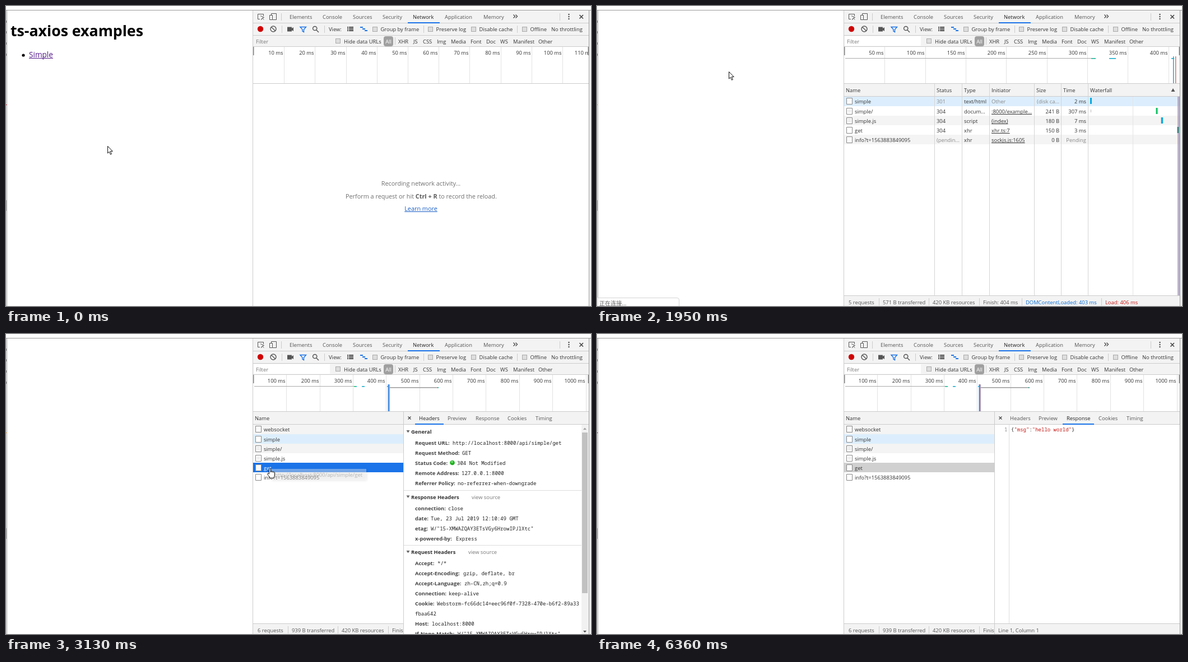
An HTML page with a canvas that plays this animation: 1044x536 px, repeating every 6.46 s.

```html
<!DOCTYPE html>
<html lang="zh-CN">
<head>
<meta charset="utf-8">
<title>Network panel demo</title>
<style>
  html, body { margin: 0; width: 100%; height: 100%; overflow: hidden; background: #fff; }
  canvas { display: block; }
</style>
</head>
<body>
<canvas id="stage" width="1044" height="536"></canvas>
<script>
const ctx = document.getElementById('stage').getContext('2d');
const LOOP = 6460;
const SANS = '"Open Sans", "Noto Sans CJK SC", sans-serif';
const MONO = '"Noto Sans Mono", monospace';
const UI = 9.4;
const INK = '#333', MUTED = '#888', BAR = '#f3f3f3', LINE = '#ccc', BLUE = '#1a73e8';
const SKY = '#03a9e4', GREEN = '#10c060';

// ---- helpers ----
function box(x, y, w, h, color) {
  ctx.fillStyle = color;
  ctx.fillRect(x, y, w, h);
}
const vline = (x, y, h, color = LINE) => box(x, y, 1, h, color);
const hline = (x, y, w, color = LINE) => box(x, y, w, 1, color);

function text(str, x, y, { color = INK, size = UI, bold = false, family = SANS, align = 'left', underline = false } = {}) {
  ctx.font = `${bold ? 'bold ' : ''}${size}px ${family}`;
  ctx.textAlign = align;
  ctx.fillStyle = color;
  ctx.fillText(str, x, y);
  const width = ctx.measureText(str).width;
  if (underline) hline(align === 'center' ? x - width / 2 : x, Math.round(y + 1), width, color);
  return width;
}
const mono = (str, x, y, color = '#222') => text(str, x, y, { family: MONO, size: 9, color });

function path(d, { x = 0, y = 0, fill, stroke, width = 1 }) {
  const shape = new Path2D(d);
  ctx.save();
  ctx.translate(x, y);
  if (fill) { ctx.fillStyle = fill; ctx.fill(shape); }
  if (stroke) { ctx.strokeStyle = stroke; ctx.lineWidth = width; ctx.stroke(shape); }
  ctx.restore();
}

function disc(x, y, r, color) {
  ctx.fillStyle = color;
  ctx.beginPath();
  ctx.arc(x, y, r, 0, 7);
  ctx.fill();
}

function clipped(x, y, w, h, draw) {
  ctx.save();
  ctx.beginPath();
  ctx.rect(x, y, w, h);
  ctx.clip();
  draw();
  ctx.restore();
}

function faded(alpha, draw) {
  ctx.save();
  ctx.globalAlpha = alpha;
  draw();
  ctx.restore();
}

function checkbox(x, y) {
  box(x, y, 9, 9, '#aaa');
  box(x + 1, y + 1, 7, 7, '#dedede');
}

// Last keyframe whose time has been reached.
const at = (keys, t) => keys.filter(k => k[0] <= t).pop();

// ---- timing ----
const cursorKeys = [
  [0, 181, 250], [260, 172, 238], [380, 145, 200], [500, 112, 155], [620, 86, 120], [740, 74, 104],
  [890, 64, 88, 'hand'],
  [1830, 140, 98], [1950, 235, 117], [2070, 305, 138], [2220, 372, 160], [2340, 421, 178],
  [2460, 443, 203], [2580, 454, 220], [2730, 466, 240, 'hand'],
  [3540, 540, 224], [3660, 655, 198], [3790, 775, 176], [3910, 832, 166],
  [4060, 868, 147], [4180, 854, 150],
  [5260, 885, 205], [5380, 940, 335], [5500, 971, 429], [5650, 1004, 494], [5800, 1010, 521],
  [5930, 1010, 560]
];
// time, pixels per tick, ms per tick
const scaleKeys = [[0, 55.2, 10], [1830, 72.35, 50], [2220, 92.6, 100], [2460, 74, 100], [2580, 59.35, 100]];
const bubbleKeys = [[0, 0], [890, .4], [1010, .8], [1140, 1], [2220, .5], [2340, .15], [2460, 0]];
const tooltipKeys = [[0, 0], [2860, 1], [3130, .38], [3260, 0]];

// ---- table data: name, status, type, initiator, size, time ----
const simple = ['simple', '301', 'text/html', 'Other', '(disk ca...', '2 ms'];
const page = ['simple/', '304', 'docum...', ':8000/example...', '241 B', '307 ms'];
const pagePending = ['simple/', '(pendin...', 'docum...', ':8000/example...', '0 B', 'Pending'];
const script = ['simple.js', '304', 'script', '(index)', '180 B', '7 ms'];
const get = ['get', '304', 'xhr', 'xhr.ts:7', '150 B', '3 ms'];
const info = (status, size, time) => ['info?t=1563883849095', status, 'xhr', 'sockjs.js:1605', size, time];
const socket = ['websocket', '101', 'websoc...', 'sockjs.js:1683', '0 B', 'Pending'];

const tableKeys = [
  [1420, [simple], ['1 requests', '0 B transferred']],
  [1560, [simple, pagePending], ['2 requests', '0 B transferred']],
  [1830, [simple, page, script, get, info('(pendin...', '0 B', 'Pending')],
    ['5 requests', '571 B transferred', '420 KB resources', 'Finish: 404 ms', 'DOMContentLoaded: 403 ms', 'Load: 406 ms']],
  [2220, [socket, simple, page, script, get, info('200', '368 B', '144 ms')],
    ['6 requests', '939 B transferred', '420 KB resources', 'Finish: 554 ms', 'DOMContentLoaded: 403 ms', 'Load: 406 ms']]
];
const rowTop = i => Math.round(161.4 + i * 17.2);

// ---- web page on the left ----
function drawPage(t) {
  hline(0, 7, 1044, '#999');
  vline(1, 8, 528, '#999');
  for (const y of [26, 45, 65, 85]) box(0, y, 1, 4, '#999');
  box(0, 347, 1, 19, '#bbb');
  box(0, 176, 2, 1, t >= 1420 && t < 6360 ? '#d9a050' : '#c03040');
  if (t < 1830) {
    text('ts-axios examples', 8, 54, { size: 26.7, bold: true, color: '#000' });
    disc(31, 88, 2.6, '#000');
    text('Simple', 41, 92, { size: 13.6, color: '#551a8b', underline: true });
  }
  faded(at(bubbleKeys, t)[1], () => {
    path('M1.5 521.5H143Q146.5 521.5 146.5 525V537H1.5Z', { fill: '#fff', stroke: '#d5d5d5' });
    text(t < 1830 ? 'localhost:8000/.../simple' : '正在连接...', 4, 534.5, { size: 10.1, color: '#666' });
  });
}

// ---- toolbars ----
function drawToolbars(t) {
  box(441, 8, 599, 65, BAR);
  for (const y of [30, 52, 72]) hline(441, y, 599);

  path('M459.5 18V14.5H449.5V23.5H453M454 17.5L460.5 20.5 457.5 21.5 460 24.5M457 22L455.5 24.5Z', { stroke: '#555' });
  path('M473.5 16V13.5H482.5V24.5H476M470.5 16.5H475.5V24.5H470.5Z', { stroke: '#555' });
  const tabs = [['Elements', 506], ['Console', 565], ['Sources', 619], ['Security', 672], ['Network', 726],
    ['Application', 783], ['Memory', 852]];
  for (const [name, x] of tabs) text(name, x, 23, { color: name === 'Network' ? '#222' : '#555' });
  box(717, 29, 57, 2, BLUE);
  path('M905.5 15.5L908.5 18.5 905.5 21.5M909.5 15.5L912.5 18.5 909.5 21.5', { stroke: '#444', width: 1.3 });
  for (const y of [15, 19, 23]) disc(1004.5, y, 1.2, '#444');
  path('M1023.5 16L1030 22.5M1030 16L1023.5 22.5', { stroke: '#444', width: 1.6 });
  for (const x of [491, 988]) vline(x, 13, 13);

  disc(454, 41, 5.2, '#d00000');
  path('M482 41A5 5 0 1 1 472 41A5 5 0 1 1 482 41M473.5 37.5L480.5 44.5', { stroke: '#555', width: 1.4 });
  path('M502 37.5H510V40L513 38V45L510 43V45.5H502Z', { fill: '#555' });
  path('M525 37.5H535.5L531.5 42V46.5L529 45V42Z', { stroke: BLUE, width: 1.4 });
  path('M554.8 40A3.6 3.6 0 1 1 547.6 40A3.6 3.6 0 1 1 554.8 40M554 43L558 47', { stroke: '#555', width: 1.5 });
  for (const y of [37, 40, 43]) { box(609, y, 2, 2, '#444'); box(612, y, 8, 2, '#444'); }
  for (const i of [0, 1, 2]) box(632 + i * 4, 37 + i * 3, 5, 2, BLUE);
  text('View:', 576, 45);
  const options = [['Group by frame', 654], ['Preserve log', 753], ['Disable cache', 830], ['Offline', 921]];
  for (const [name, x] of options) { checkbox(x, 37); text(name, x + 14.5, 45); }
  text('No throttling', 973, 45);
  for (const x of [492, 568, 745, 912]) vline(x, 35, 13);

  if (t >= 1420) box(442, 54, 136, 17, '#fff');
  text('Filter', 446, 67, { color: '#777' });
  checkbox(588, 58);
  text('Hide data URLs', 603, 66.5);
  ctx.fillStyle = '#a0a0a0';
  ctx.beginPath();
  ctx.roundRect(674, 54, 17, 18, 4);
  ctx.fill();
  text('All', 682.5, 67, { color: '#fff', align: 'center' });
  vline(694, 56, 13);
  const filters = [['XHR', 700], ['JS', 727], ['CSS', 744], ['Img', 769], ['Media', 794], ['Font', 829],
    ['Doc', 857], ['WS', 882], ['Manifest', 905], ['Other', 950]];
  for (const [name, x] of filters) text(name, x, 67);
}

// ---- timeline overview ----
function drawOverview(t) {
  const [, step, ms] = at(scaleKeys, t);
  clipped(441, 73, 599, 66, () => {
    for (let i = 1; i * step < 640; i++) {
      const x = Math.round(441 + i * step);
      vline(x, 73, 65, '#e2e2e2');
      text(`${i * ms} ms`, x - 1.5, 87, { align: 'right' });
    }
    if (t >= 2220) {
      hline(443, 93, 178, '#aaa');
      box(621, 93, 3, 1.5, GREEN); box(624, 93, 2, 1.5, SKY);
      box(635, 93, 5, 1.5, '#08a8c8');
      box(680, 93, 2, 1.5, SKY);
      box(681.5, 90, 2.5, 48, '#4d90e0'); vline(684, 90, 48, '#e0a0a0');
      box(685, 95, 86, 1.5, '#999'); box(770, 95, 2, 1.5, '#08a888');
    } else if (t >= 1830) {
      hline(443, 93, 439, '#aaa');
      box(882, 93, 8, 1.5, '#10b090');
      box(914, 93, 12, 1.5, '#08a8c8');
      box(1025, 93, 5, 1.5, '#08a8c8');
      box(1028, 90, 1.5, 48, '#4d90e0'); box(1032, 90, 1.5, 48, '#d07070');
    } else if (t >= 1420) {
      box(443, 93, t >= 1560 ? 596 : 12, 1, '#aaa');
    }
  });
  box(441, 73, 1.5, 15, '#888');
  box(1038.5, 73, 1.5, 15, '#888');
  hline(441, 138, 599);
}

// ---- request table ----
function drawIdle() {
  const opts = { size: 10.85, color: '#6e6e6e' };
  text('Recording network activity...', 740.5, 320.5, { ...opts, align: 'center' });
  let x = 606;
  x += text('Perform a request or hit ', x, 343.5, opts);
  x += text('Ctrl + R', x, 343.5, { ...opts, bold: true, color: '#5a5a5a' });
  text(' to record the reload.', x, 343.5, opts);
  text('Learn more', 740.5, 366, { ...opts, align: 'center', color: '#1a5fc8', underline: true });
}

function drawWaterfall(t, count) {
  const bar = (row, x, w, color) => box(x, rowTop(row) + 3, w, 11, color);
  const offset = t >= 2220 ? 1 : 0;
  vline(offset ? 971 : 956, 162, 355, '#e4e4e4');
  bar(offset, 880, offset ? 2 : 3, SKY);
  if (count < 5) return;
  box(881, rowTop(1 + offset) + 6, 1, 5, '#bbb');
  if (offset) {
    bar(2, 936.5, 2, '#40c880');
    bar(3, 940.5, 2.5, SKY);
    box(956, rowTop(5) + 6, 27, 6, '#aaa');
    bar(5, 982.5, 2, SKY);
    box(955, 162, 1.5, 355, '#84606c');
    bar(4, 954.5, 2, '#555');
  } else {
    bar(1, 997.5, 3, GREEN);
    bar(2, 1006, 1, '#ccc');
    bar(2, 1007, 3, SKY);
    box(1036, 162, 1.5, 355, '#80b0e8');
    box(1038, 162, 1.5, 355, '#d08080');
    bar(3, 1035.5, 2.5, '#0c9090');
  }
}

function drawTable(t) {
  const [, rows, totals] = at(tableKeys, t);
  const detail = t >= 3130;
  const right = detail ? 709 : 1040;
  clipped(441, 139, right - 441, 397, () => {
    rows.forEach((row, i) => {
      const top = rowTop(i), selected = detail && row === get;
      let color = row === simple ? '#dceefd' : i % 2 ? '#fff' : '#f4f4f4';
      if (selected) color = t < 4460 ? BLUE : '#d0d0d0';
      box(441, top, 599, rowTop(i + 1) - top, color);
    });
    box(441, 139, 599, 22, BAR);
    hline(441, 161, 599);
    const columns = [['Name', 444], ['Status', 606], ['Type', 655], ['Initiator', 704], ['Size', 784], ['Time', 832], ['Waterfall', 880]];
    for (const [name, x] of columns.slice(0, detail ? 1 : 7)) text(name, x, 154);
    if (!detail) {
      drawWaterfall(t, rows.length);
      for (const x of [602, 651, 700, 780, 828, 876]) vline(x, 139, 378, '#d4d4d4');
      path('M1024.5 153L1028 147 1031.5 153Z', { fill: '#555' });
    }
    rows.forEach(([name, status, type, initiator, size, time], i) => {
      const y = rowTop(i) + 13;
      path('M445.5 3.5H455.5V14.5H445.5Z', { y: rowTop(i), fill: i % 2 ? '#fff' : '#fafafa', stroke: '#888' });
      if (name === 'simple.js' || name === 'simple/') for (const dy of [6, 8, 10]) hline(448, rowTop(i) + dy, 5, '#e0e0e0');
      text(name, 460, y, { color: detail && name === 'get' && t < 4460 ? '#fff' : INK });
      if (detail) return;
      const gray = value => ({ color: /^(301|Other|Pending|\()/.test(value) ? MUTED : INK });
      text(status, 606, y, gray(status));
      text(type, 655, y);
      text(initiator, 704, y, { color: initiator === 'Other' ? MUTED : INK, underline: initiator !== 'Other' });
      text(size, 825, y, { ...gray(size), align: 'right' });
      text(time, 873, y, { ...gray(time), align: 'right' });
    });
    box(441, 517, 599, 19, BAR);
    hline(441, 517, 599);
    const stops = [449, 510, 599, 689, 765, 907];
    totals.forEach((label, i) => {
      text(label, stops[i], 533, { color: ['#0b6bd0', '#c41a16'][i - 4] || '#555' });
      if (i) vline(stops[i] - 7, 522, 13);
    });
  });
}

// ---- request details ----
const sections = [
  ['General', 178, 0, [
    ['Request URL:', 797, 'http://localhost:8000/api/simple/get'],
    ['Request Method:', 814, 'GET'],
    ['Status Code:', 805, '304 Not Modified'],
    ['Remote Address:', 813, '127.0.0.1:8000'],
    ['Referrer Policy:', 806, 'no-referrer-when-downgrade']]],
  ['Response Headers', 294.5, 831, [
    ['connection:', 789, 'close'],
    ['date:', 758, 'Tue, 23 Jul 2019 12:10:49 GMT'],
    ['etag:', 758, 'W/"15-XMWAZQAY3ETsVGy6HrowIPJlXtc"'],
    ['x-powered-by:', 803, 'Express']]],
  ['Request Headers', 393, 825, [
    ['Accept:', 770, '*/*'],
    ['Accept-Encoding:', 816, 'gzip, deflate, br'],
    ['Accept-Language:', 818, 'zh-CN,zh;q=0.9'],
    ['Connection:', 790, 'keep-alive'],
    ['Cookie:', 769, 'Webstorm-fc66dc14=eec96f0f-7328-470e-b6f2-89a33'],
    ['', 730, 'fbaa642'],
    ['Host:', 760, 'localhost:8000'],
    ['If-None-Match:', 806, 'W/"15-XMWAZQAY3ETsVGy6HrowIPJlXtc"']]]
];

function drawHeaders() {
  clipped(710, 162, 317, 374, () => {
    for (const [title, y, sourceX, fields] of sections) {
      path('M0 0H6L3 4.5Z', { x: 714.5, y: y - 6, fill: '#666' });
      text(title, 723, y, { bold: true });
      if (sourceX) {
        text('view source', sourceX, y, { color: '#777' });
        hline(710, Math.round(y - 16), 317, '#ddd');
      }
      fields.forEach(([label, x, value], i) => {
        const rowY = y + 20 + i * 18;
        text(label, 730, rowY, { bold: true, color: '#444' });
        mono(value, x, rowY);
      });
    }
    disc(796.5, 230, 4.3, '#20b020');
    disc(796, 228.5, 2, '#70e070');
  });
  box(1027, 162, 13, 374, '#f1f1f1');
  box(1028, 176, 10, 287, '#c1c1c1');
  path('M1030 171H1036L1033 167.5Z', { fill: '#a0a0a0' });
  path('M1030 530H1036L1033 533.5Z', { fill: '#505050' });
}

function drawResponse() {
  vline(735, 162, 355, '#ddd');
  text('1', 732.5, 174, { family: MONO, size: 9, color: MUTED, align: 'right' });
  let x = 739;
  for (const [part, color] of [['{', '#222'], ['"msg"', '#c41a16'], [':', '#222'], ['"hello world"', '#c41a16'], ['}', '#222']])
    x += mono(part, x, 174, color);
  box(710, 517, 330, 19, BAR);
  hline(710, 517, 330);
  text('Line 1, Column 1', 716, 533, { color: '#555' });
}

function drawDetail(t) {
  const responding = t >= 4460;
  box(710, 139, 330, 22, BAR);
  hline(710, 161, 330);
  vline(709, 139, 397);
  if (t >= 4060 && t < 5260) box(831, 140, 56, 21, '#e8e8e8');
  path('M717.5 147.5L722.5 152.5M722.5 147.5L717.5 152.5', { stroke: '#444', width: 1.2 });
  const active = responding ? 'Response' : 'Headers';
  for (const [name, x] of [['Headers', 737], ['Preview', 788], ['Response', 838], ['Cookies', 895], ['Timing', 945]])
    text(name, x, 154, { color: name === active ? '#222' : '#555' });
  if (responding) box(831, 160, 56, 2, BLUE);
  else box(730, 160, 51, 2, BLUE);
  if (responding) drawResponse();
  else drawHeaders();
}

function drawTooltip(t) {
  faded(at(tooltipKeys, t)[1], () => {
    ctx.shadowColor = 'rgba(0,0,0,.25)';
    ctx.shadowBlur = 4;
    ctx.shadowOffsetX = ctx.shadowOffsetY = 1;
    box(474, 241, 169, 20, '#fff');
    ctx.shadowColor = 'transparent';
    text('http://localhost:8000/api/simple/get', 479, 255, { color: '#555' });
  });
}

// ---- pointer ----
const ARROW = 'M.5.5V13L3.3 10.4 5.4 15.3 7.4 14.4 5.3 9.6H9.3Z';
const HAND = 'M3.5 1.8a1.3 1.3 0 0 1 2.6 0V6.8a1.2 1.2 0 0 1 2.4 0a1.2 1.2 0 0 1 2.4.5a1.2 1.2 0 0 1 2.4.7V12C13.3 14 12 15 12 17.3H5C5 14.8 1 12.7.6 10 .5 8.6 2.2 8.4 3.5 10.2Z';

function drawCursor(t) {
  const [, x, y, kind] = at(cursorKeys, t);
  path(kind === 'hand' ? HAND : ARROW, { x, y, fill: '#fff', stroke: '#111' });
}

function render() {
  const t = performance.now() % LOOP;
  box(0, 0, 1044, 536, '#fff');
  drawPage(t);
  drawToolbars(t);
  drawOverview(t);
  if (t < 1420) drawIdle();
  else drawTable(t);
  if (t >= 3130) drawDetail(t);
  vline(440, 8, 528);
  vline(1040, 8, 528, '#999');
  box(1041, 8, 3, 528, '#f2f2f2');
  drawTooltip(t);
  drawCursor(t);
  requestAnimationFrame(render);
}
render();
</script>
</body>
</html>
```
